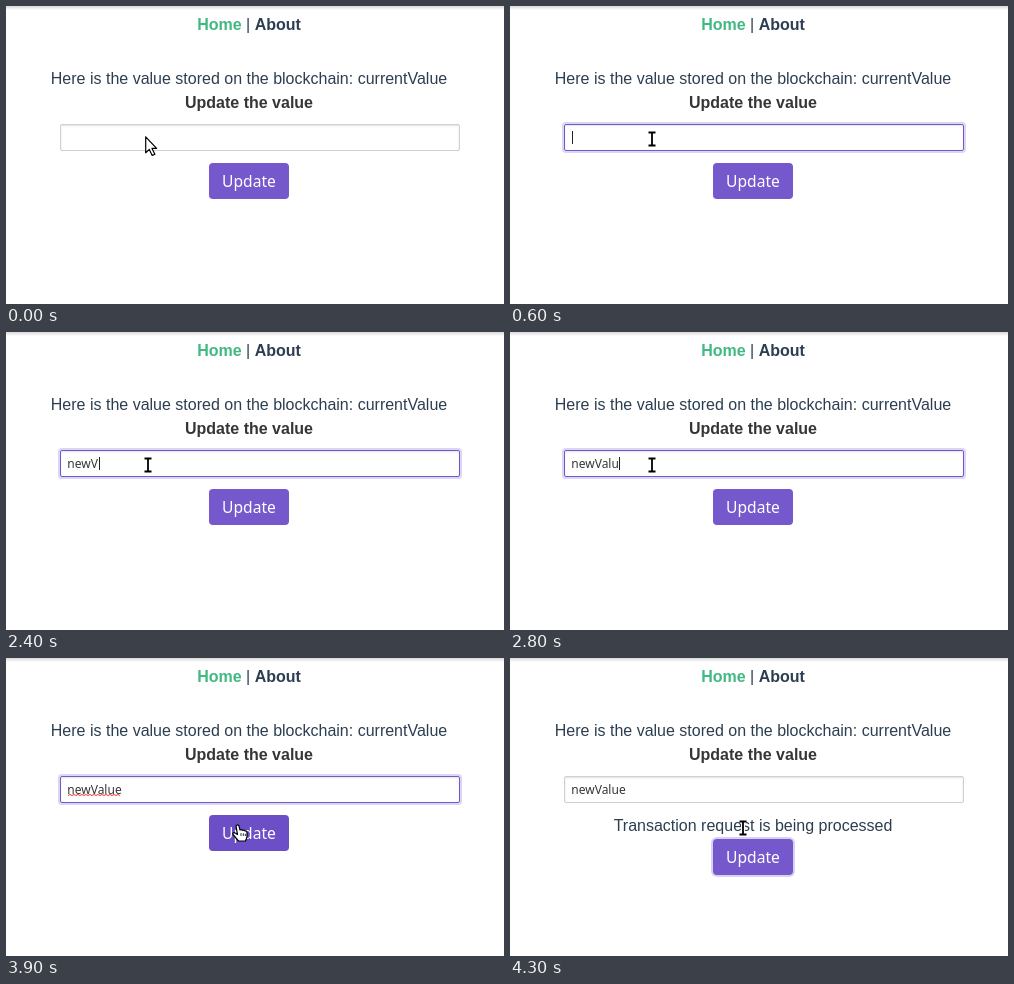
Animation of 498x298 px, one loop 8 s. Source, as an HTML page:

```html
<!DOCTYPE html>
<html lang="en">
<head>
<meta charset="utf-8">
<title>Update the value</title>
<style>
  html, body { margin: 0; width: 100%; height: 100%; overflow: hidden; background: #fff; }
  #stage { position: relative; width: 498px; height: 298px; overflow: hidden; }
  #top { position: absolute; inset: 0 0 auto; height: 4px; background: linear-gradient(#d8d8d8, #fff); }
  #field, #button { position: absolute; box-sizing: border-box; }
  #field {
    left: 54px; top: 118px; width: 400px; height: 27px;
    border: 1px solid #d0d0d0; border-radius: 2px;
    box-shadow: inset 0 1px 2px rgba(10, 10, 10, .12);
  }
  #field.hover { border-color: #b5b5b5; }
  #field.focus {
    border-color: #7658cd;
    box-shadow: inset 0 1px 2px rgba(10, 10, 10, .1), 0 0 0 2px rgba(121, 87, 213, .25);
  }
  #button {
    left: 203px; top: 157px; width: 80px; height: 36px;
    border-radius: 4px; background: #7658cd;
  }
  #button.hover { background: #6c4fc6; }
  #button.focus { box-shadow: 0 0 0 2px rgba(121, 87, 213, .28); }
  #button.low { top: 181px; }
  svg { position: absolute; left: 0; top: 0; }
  text { font: 16px "Liberation Sans", Arial, sans-serif; fill: #2c3e50; }
  .bold { font-weight: 700; }
  .mid { text-anchor: middle; }
  #typed { font: 12px "Noto Sans", "Open Sans", sans-serif; fill: #363636; }
  #label { font: 15.6px "Noto Sans", "Open Sans", sans-serif; fill: #fff; }
  .pointer { stroke: #000; stroke-linejoin: round; fill: #fff; }
</style>
</head>
<body>
<div id="stage">
  <div id="top"></div>
  <div id="field"></div>
  <div id="button"></div>
  <svg width="498" height="298" viewBox="0 0 498 298">
    <text class="mid" x="243" y="24"><tspan class="bold" fill="#42b983" style="fill:#42b983">Home</tspan> | <tspan class="bold">About</tspan></text>
    <text class="mid" x="243" y="78">Here is the value stored on the blockchain: currentValue</text>
    <text class="mid bold" x="243" y="102" style="fill:#363636">Update the value</text>
    <text id="typed" x="61.3" y="136"></text>
    <path id="squiggle" d="M62 137.5 l2 -1 l2 1 l2 -1 l2 1 l2 -1 l2 1 l2 -1 l2 1 l2 -1 l2 1 l2 -1 l2 1 l2 -1 l2 1 l2 -1 l2 1 l2 -1 l2 1 l2 -1 l2 1 l2 -1 l2 1 l2 -1 l2 1 l2 -1 l2 1" fill="none" stroke="#e33"/>
    <rect id="caret" y="125" width="1" height="13" fill="#222"/>
    <text id="notice" class="mid" x="243" y="173">Transaction request is being processed</text>
    <text id="label" class="mid" x="243" y="181">Update</text>
    <g id="arrow" class="pointer">
      <path d="M.7 .8 V16.8 L4.3 13.4 L7.2 19.4 L9.9 18.2 L7 12.4 H11.6 Z" stroke-width="1.2"/>
    </g>
    <g id="beam" fill="none">
      <path d="M-3 -6.5 H3 M-3 6.5 H3 M0 -6.5 V6.5" stroke="#fff" stroke-width="4"/>
      <path d="M-3.5 -6.5 H3.5 M-3.5 6.5 H3.5 M0 -6.5 V6.5" stroke="#000" stroke-width="1.8"/>
    </g>
    <g id="hand" class="pointer">
      <path d="M4 1.8 Q5.3 .2 6.9 1.7 L8 6 Q9.5 5.2 10.5 6.3 Q12 5.6 13 7 Q15 6.6 15 8.8 V13 L13.5 17 H6.5 L1 10.5 Q.3 8.5 2.5 8.7 L5.5 10.5 Z" stroke-width="1.2"/>
      <path d="M9 9 V12 M11.3 9.3 V12 M13.3 9.8 V12" stroke-width=".8"/>
    </g>
  </svg>
</div>
<script>
const LOOP = 8000;
const $ = id => document.getElementById(id);

// Each step changes only the properties it names; n counts typed letters.
const steps = [
  { at: 0, n: 0, caret: 0, field: "", button: "", pointer: ["arrow", 139, 130] },
  { at: 300, field: "hover", pointer: ["beam", 142, 133] },
  { at: 600, field: "focus", caret: 62 },
  { at: 1100, caret: 0 },
  { at: 1500, n: 1, caret: 69 },
  { at: 1700, n: 2, caret: 76 },
  { at: 1900, n: 3, caret: 85 },
  { at: 2400, n: 4, caret: 93 },
  { at: 2600, n: 5, caret: 99 },
  { at: 2700, n: 6, caret: 102 },
  { at: 2800, n: 7, caret: 109 },
  { at: 3300, n: 8, caret: 116 },
  { at: 3500, caret: 0, pointer: ["beam", 146, 135] },
  { at: 3600, pointer: ["beam", 158.5, 140] },
  { at: 3700, pointer: ["arrow", 200, 153] },
  { at: 3900, button: "hover", squiggle: true, pointer: ["hand", 226, 166] },
  { at: 4100, field: "", button: "hover focus", squiggle: false },
  { at: 4300, button: "focus low", notice: true, pointer: ["beam", 233, 170] }
];

function show(id, on) {
  $(id).style.display = on ? "" : "none";
}

function draw(t) {
  const s = Object.assign({}, ...steps.filter(step => step.at <= t));
  $("typed").textContent = "newValue".slice(0, s.n);
  $("caret").setAttribute("x", s.caret);
  show("caret", s.caret);
  show("squiggle", s.squiggle);
  show("notice", s.notice);
  $("field").className = s.field;
  $("button").className = s.button;
  $("label").setAttribute("y", s.notice ? 205 : 181);
  const [kind, x, y] = s.pointer;
  for (const id of ["arrow", "beam", "hand"]) show(id, id === kind);
  $(kind).setAttribute("transform", `translate(${x} ${y})`);
}

const start = performance.now();
function tick() {
  draw((performance.now() - start) % LOOP);
  requestAnimationFrame(tick);
}
tick();
</script>
</body>
</html>
```
